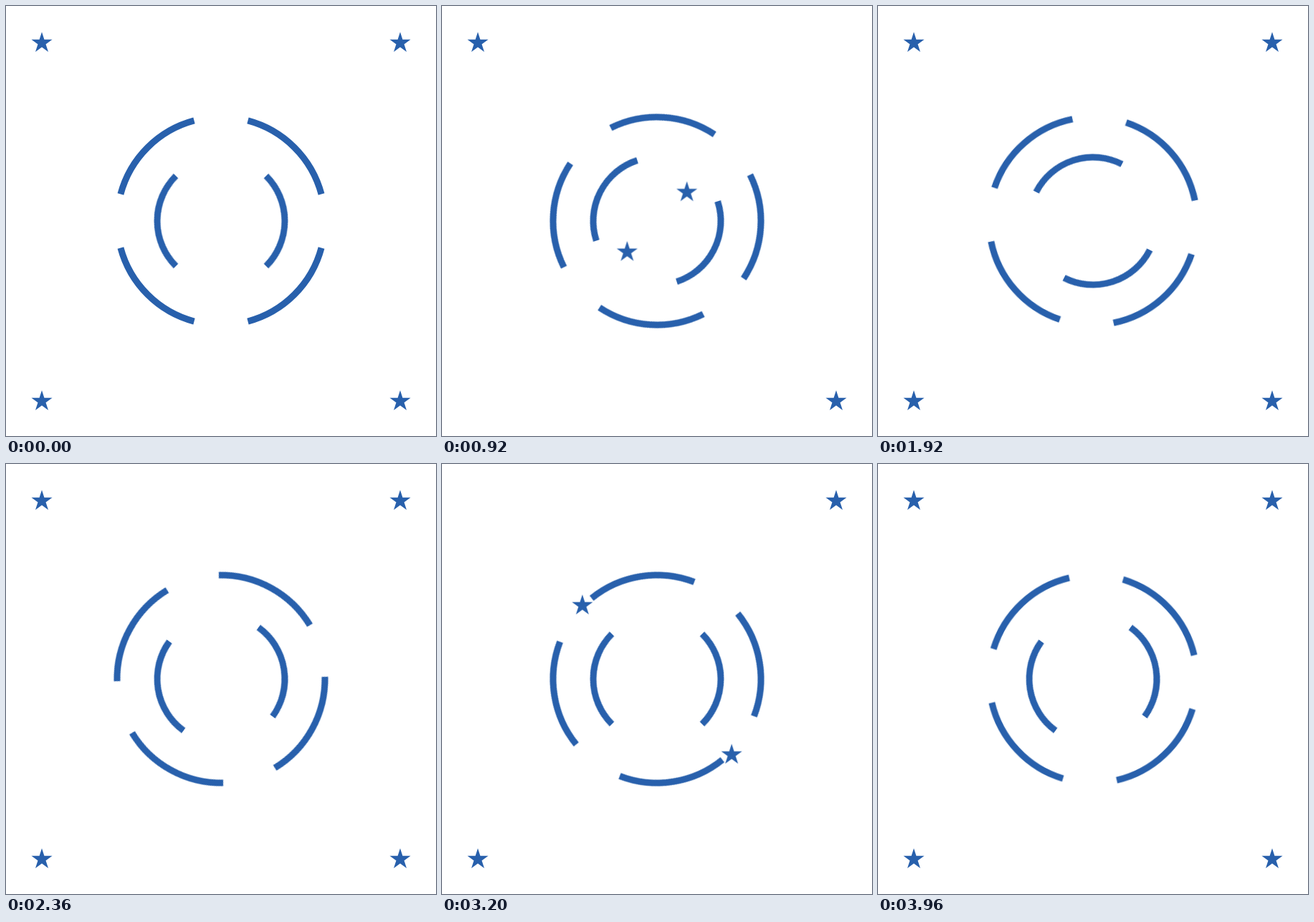
An HTML page without scripts that plays this animation: 600x600 px, repeating every 4 s.

```html
<!DOCTYPE html>
<html lang="en">
<head>
<meta charset="utf-8">
<title>Rings and stars</title>
<style>
  html, body { margin: 0; width: 100%; height: 100%; overflow: hidden; background: #fff; }
  svg { display: block; width: 100vw; height: 100vh; }

  /* 25 poses a second; the small negative delay keeps steps clear of their edges */
  .ring, .star { animation: 4s -2ms infinite; }

  .ring { fill: none; stroke: #2860ac; stroke-width: 9; }
  .outer { stroke-dasharray: 60 30; stroke-dashoffset: -15; animation-name: outer; animation-timing-function: steps(100); }
  .inner { stroke-dasharray: 90 90; animation-name: inner; animation-timing-function: steps(100); }

  .star { fill: #2860ac; animation-name: cross; animation-timing-function: steps(24); }
  .late { animation-delay: -2002ms; }

  @keyframes outer { to { transform: rotate(-180deg); } }
  @keyframes inner {
    from { transform: rotate(-45deg); }
    to { transform: rotate(855deg); }
  }
  /* stars on one diagonal swap corners */
  @keyframes cross {
    0%, 13% { transform: translate(0, 0); }
    37%, 100% { transform: translate(var(--x), var(--y)); }
  }
</style>
</head>
<body>
<svg viewBox="0 0 600 600">
  <defs>
    <path id="star" d="M0-13.7 8.99 13.98-14.55-3.13H14.55L-8.99 13.98Z"/>
  </defs>
  <g transform="translate(300 300)">
    <circle class="ring outer" r="145" pathLength="360"/>
    <circle class="ring inner" r="89" pathLength="360"/>
  </g>
  <use class="star" href="#star" x="550" y="50" style="--x: -500px; --y: 500px"/>
  <use class="star" href="#star" x="50" y="550" style="--x: 500px; --y: -500px"/>
  <use class="star late" href="#star" x="50" y="50" style="--x: 500px; --y: 500px"/>
  <use class="star late" href="#star" x="550" y="550" style="--x: -500px; --y: -500px"/>
</svg>
</body>
</html>
```
